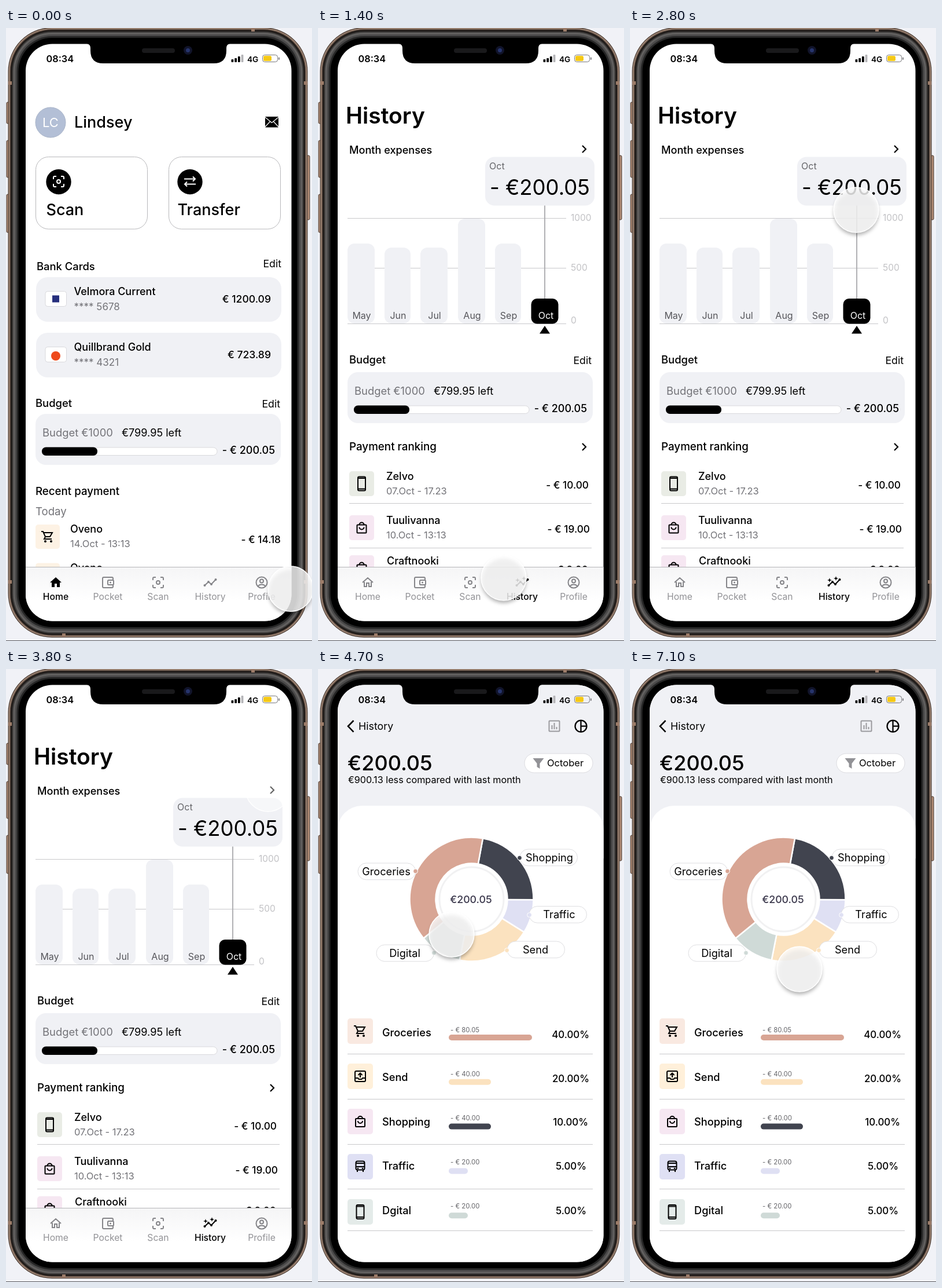
Recreate the animation shown at these times as an HTML page. Size 529x1058 px, loop 7200 ms.

```html
<!DOCTYPE html>
<html lang="en">
<head>
<meta charset="utf-8">
<title>Banking app walkthrough</title>
<style>
  html, body { margin: 0; width: 100%; height: 100%; overflow: hidden; background: #f1f2f7; }
  svg { display: block; width: 100%; height: 100%; }
  text { font-family: Inter, sans-serif; white-space: pre; }
</style>
</head>
<body>
<svg id="stage" viewBox="0 0 529 1058"></svg>
<script>
const LOOP = 7200, STEP = 100;
const SOFT = '#f0f1f5', GREY = '#737378', RULE = '#c8c8cb';

// Drawing helpers
const text = (x, y, size, str, { w = 400, c = '#000', a = 'start' } = {}) =>
  `<text x="${x}" y="${y}" font-size="${size}" font-weight="${w}" fill="${c}" text-anchor="${a}">${str}</text>`;
const bold = (x, y, size, str, a) => text(x, y, size, str, { w: 500, a });
const rect = (x, y, w, h, r, fill, stroke = 'none', sw = 1) =>
  `<rect x="${x}" y="${y}" width="${w}" height="${h}" rx="${r}" fill="${fill}" stroke="${stroke}" stroke-width="${sw}"/>`;
const circle = (x, y, r, fill, stroke = 'none', sw = 1) =>
  `<circle cx="${x}" cy="${y}" r="${r}" fill="${fill}" stroke="${stroke}" stroke-width="${sw}"/>`;
const path = (d, stroke, sw = 1, fill = 'none') =>
  `<path d="${d}" fill="${fill}" stroke="${stroke}" stroke-width="${sw}"/>`;
const rule = (x1, x2, y, c = RULE) => path(`M${x1} ${y}H${x2}`, c);
const chevron = y => path(`M457 ${y - 6}l6 6-6 6`, '#000', 2.2);
const dot = (x, y, r) => circle(x, y, r, 'currentColor');

// Icons on a 24 unit grid
const line = d => path(d, 'currentColor', 2);
const box = (x, y, w, h, r) => rect(x, y, w, h, r, 'none', 'currentColor', 2);
const trend = line('M2.5 17 9 11l5 4 7.5-8') + dot(2.5, 17, 2) + dot(9, 11, 2) + dot(14, 15, 2) + dot(21.5, 7, 2);
const ICONS = {
  home: path('M10 20v-6h4v6h5v-8h3L12 3 2 12h3v8z', 'none', 0, 'currentColor'),
  homeLine: line('M6 11v8h4v-6h4v6h4v-8M3 12l9-8 9 8'),
  wallet: box(3, 3, 18, 18, 2) + rect(12, 8, 10, 8, 1.5, '#fafafa', 'currentColor', 2) + dot(16.5, 12, 1.5),
  scan: line('M3 8V5a2 2 0 0 1 2-2h3M16 3h3a2 2 0 0 1 2 2v3M21 16v3a2 2 0 0 1-2 2h-3M8 21H5a2 2 0 0 1-2-2v-3') +
    circle(12, 12, 3, 'none', 'currentColor', 2),
  trend,
  sparkle: trend + path('M4 4l1 3 3 1-3 1-1 3-1-3-3-1 3-1zM15 1l1 3 3 1-3 1-1 3-1-3-3-1 3-1z', 'none', 0, 'currentColor'),
  person: circle(12, 12, 9.5, 'none', 'currentColor', 2) + circle(12, 9.5, 3, 'none', 'currentColor', 2) +
    line('M5.5 18.5c3-4 10-4 13 0'),
  swap: line('M2 7.5h19M17 3.500l4 4-4 4M22 16.500H3M7 12.500l-4 4 4 4'),
  cart: line('M1 3h3l4 9h8l4-7H5.500M8 12l-2 4h13') + dot(8, 20, 2) + dot(18, 20, 2),
  bag: box(4, 7, 16, 14, 1) + line('M8 7a4 4 0 0 1 8 0M8 11a4 4 0 0 0 8 0'),
  phone: box(5.5, 0, 13, 24, 2) + line('M6 2.500h12M6 21h12'),
  send: box(3, 3, 18, 18, 2) + line('M12 14V7M8.500 10l3.500-3.500 3.500 3.500M3 15h5l1.500 2h5l1.500-2h5'),
  bus: box(4.5, 2.5, 15, 15, 3) + line('M5 6h14M5 12h14M7 17v4M17 17v4') + dot(8, 15, 1.3) + dot(16, 15, 1.3),
};
const icon = (name, cx, cy, size = 24, color = '#000') =>
  `<g color="${color}" transform="translate(${cx - size / 2} ${cy - size / 2}) scale(${size / 24})">${ICONS[name]}</g>`;
const tile = (name, x, y, size, fill) => rect(x, y, size, size, 5, fill) + icon(name, x + size / 2, y + size / 2);

// Shared blocks
const budget = y => rect(51, y, 424, 88, 18, SOFT) +
  text(63, y + 39, 18.4, 'Budget €1000', { c: GREY }) + text(200, y + 39, 18.1, '€799.95 left') +
  rect(62, y + 58, 303, 13.5, 6.7, '#fff', '#d9d9dc') + rect(62, y + 57.5, 96, 14.5, 7, '#000') +
  bold(465, y + 69, 18, '- € 200.05', 'end');

function nav(active) {
  const items = [['Home', active ? 'homeLine' : 'home', 86], ['Pocket', 'wallet', 176], ['Scan', 'scan', 263],
    ['History', active ? 'sparkle' : 'trend', 353], ['Profile', 'person', 442]];
  return rect(34, 930, 460, 96, 0, 'url(#bar)') + rule(34, 494, 930.5, '#b5b5b8') +
    items.map(([label, name, x], i) => {
      const on = i === active;
      return icon(name, x, 957, 24, on ? '#000' : '#858589') +
        text(x, 987, 15.7, label, { w: on ? 500 : 400, c: on ? '#000' : '#929296', a: 'middle' });
    }).join('');
}

const bankCard = (y, name, digits, amount, mark) => rect(52, y, 424, 77, 20, SOFT) +
  rect(68, y + 24.5, 36.5, 26, 4, '#fff', '#d9d9dd') + mark +
  bold(117.5, y + 31, 18, name) + text(117.5, y + 57, 17, '**** ' + digits, { c: GREY }) +
  bold(458, y + 44, 17.6, amount, 'end');

const payment = (x, y, name, date, amount, right, dy) => bold(x, y, 18, name) +
  text(x, y + 25, 16.5, date, { c: GREY }) + bold(right, y + dy, 17.3, amount, 'end');

const homePage = () =>
  circle(77, 163, 26, '#b3bfd6', '#a9b4c8') + text(77, 171, 22, 'LC', { c: '#fff', a: 'middle' }) +
  bold(118, 172, 27, 'Lindsey') +
  rect(448, 153, 23, 18.5, 1, '#000') + path('M448 154l11.500 9.500L471 154M448 170.500l8.500-9M471 170.500l-8.500-9', '#fff', 1.2) +
  [[51, 'scan', 'Scan', 91], [281, 'swap', 'Transfer', 318]].map(([x, name, label, cx]) =>
    rect(x + .5, 222.5, 193, 124.5, 22, '#fff', '#b8b8bb') + circle(cx, 265.5, 21.7, '#000') +
    icon(name, cx, 265, 24, '#fff') + bold(cx - 21.5, 323, 27, label)).join('') +
  bold(53, 418, 18.4, 'Bank Cards') + text(476, 413, 17.7, 'Edit', { a: 'end' }) +
  bankCard(430, 'Velmora Current', '5678', '€ 1200.09', rect(80, 461.5, 12, 12, 0, '#262f7d')) +
  bankCard(526, 'Quillbrand Gold', '4321', '€ 723.89', circle(86, 566, 8, '#ee4a1c')) +
  bold(51, 654, 18.4, 'Budget') + text(474, 655, 17.7, 'Edit', { a: 'end' }) + budget(666) +
  bold(51, 806, 18.7, 'Recent payment') + text(51, 841, 18.6, 'Today', { c: GREY }) +
  tile('cart', 51, 857, 42, '#fdf2e4') + payment(111, 871, 'Oveno', '14.Oct - 13:13', '- € 14.18', 475, 18) +
  tile('cart', 51, 923.5, 42, '#fdf2e4') + bold(111, 938, 18, 'Oveno') + nav(0);

const historyPage = () => {
  const bars = [['May', 51, 47, 372], ['Jun', 115, 45, 379], ['Jul', 177, 47, 379], ['Aug', 242, 47, 329], ['Sep', 306, 45, 372]];
  return text(48, 165, 39, 'History', { w: 600 }) +
    bold(54, 217, 18.1, 'Month expenses') + chevron(209) +
    [[328.5, 333, 1000], [414.5, 419, 500], [510.5, 510, 0]].map(([y, ty, n]) =>
      rule(51, 429, y) + text(437, ty, 15.5, n, { c: '#c2c2c5' })).join('') +
    bars.map(([m, x, w, y]) => rect(x, y, w, 510 - y, 12, SOFT) +
      text(x + w / 2 + 1, 502, 16, m, { c: '#55555a', a: 'middle' })).join('') +
    path('M392 304V468', '#a9a9ac', 1.8) + rect(368.5, 467, 47, 43.5, 10, '#000') +
    text(394, 502, 16, 'Oct', { c: '#fff', a: 'middle' }) + path('M383 527.500h18l-9-13.500z', 'none', 0, '#000') +
    rect(289, 222.5, 189, 84, 16, SOFT) + text(296, 244, 16, 'Oct', { c: '#66666a' }) +
    text(470, 288, 36.5, '- €200.05', { a: 'end' }) +
    bold(54, 579, 18.4, 'Budget') + text(473, 580, 17.7, 'Edit', { a: 'end' }) + budget(594) +
    bold(54, 729, 18.8, 'Payment ranking') + chevron(723) +
    tile('phone', 54, 765, 43, '#e9ece5') + payment(118, 780, 'Zelvo', '07.Oct - 17.23', '- € 10.00', 468, 15) +
    rule(54, 473, 820.5) +
    tile('bag', 54, 841, 43, '#f6e7f2') + payment(118, 856, 'Tuulivanna', '10.Oct - 13:13', '- € 19.00', 470, 15) +
    rule(54, 473, 897.5) +
    tile('bag', 54, 910, 43, '#f6e7f2') + bold(119, 926, 18, 'Craftnooki') + bold(467, 941, 17.3, '- € 9.00', 'end') + nav(3);
};

const HUES = { Groceries: '#d8a594', Send: '#fbe2bf', Shopping: '#41444f', Traffic: '#dfe0f3', Digital: '#cfdad7' };

function slice(from, to, fill) {
  const at = (deg, r) => [265.5 + r * Math.sin(deg * Math.PI / 180), 397.5 - r * Math.cos(deg * Math.PI / 180)].join(' ');
  const big = +(to - from > 180);
  return path(`M${at(from, 107)}A107 107 0 ${big} 1 ${at(to, 107)}L${at(to, 62)}A62 62 0 ${big} 0 ${at(from, 62)}z`, '#fff', 2.5, fill);
}

const detailPage = () => {
  const slices = [['Shopping', 10.5, 90.4], ['Traffic', 90.4, 122], ['Send', 122, 191.2], ['Digital', 191.2, 231], ['Groceries', 231, 370.5]];
  const pills = [['Groceries', 69, 335, 168.5, 349], ['Shopping', 349, 311, 348.5, 326], ['Traffic', 365, 409.5, 365.5, 424.5],
    ['Send', 327, 470, 326.5, 485.5], ['Digital', 101, 476, 200.5, 490]];
  const rows = [['Groceries', 'cart', '#f9e9e1', 144, '80.05', '40.00%', 469], ['Send', 'send', '#fff0da', 73, '40.00', '20.00%', 469],
    ['Shopping', 'bag', '#f6e7f2', 73, '40.00', '10.00%', 467], ['Traffic', 'bus', '#dfe0f4', 33, '20.00', '5.00%', 464],
    ['Digital', 'phone', '#e4ebe9', 33, '20.00', '5.00%', 464]];
  return rect(34, 27, 460, 300, 0, SOFT) + rect(34, 236, 460, 840, 42, '#fff') +
    path('M61.500 89 52 98.800l9.500 9.800', '#000', 2.6) + text(70, 105, 17.8, 'History') +
    rect(399.5, 89.5, 18, 18, 1, 'none', '#9a9a9e', 2) + path('M404.500 97v7M408.500 93v11M412.500 100v4', '#9a9a9e', 2) +
    circle(454.5, 98.7, 10, 'none', '#000', 2.3) + path('M454.500 89v20M454.500 98.700h10', '#000', 2.3) +
    bold(51, 175, 36, '€200.05') + text(52, 197, 16.2, '€900.13 less compared with last month') +
    rect(357, 146, 118, 33, 16.5, '#fff', '#dcdce0') + path('M371.500 154h19l-7 9v9l-5-3v-6z', 'none', 0, '#929296') +
    text(396, 168, 16.5, 'October') +
    slices.map(([name, a, b]) => slice(a, b, HUES[name])).join('') +
    circle(265.5, 397.5, 55.5, '#fff', '#f1f1f2', 3) +
    text(264.5, 404, 17.8, '€200.05', { w: 500, c: '#3b384c', a: 'middle' }) +
    pills.map(([name, x, y, dx, dy]) => rect(x, y, 99.5, 28.7, 14.3, '#fff', '#dedee1') +
      text(x + (name === 'Shopping' ? 51 : name === 'Traffic' ? 52 : 49), y + 20.5, 18.2, name, { a: 'middle' }) +
      circle(dx, dy, 3.9, HUES[name], '#fff')).join('') +
    rows.map(([name, glyph, fill, w, sum, pct, right], i) => {
      const y = 603 + 78 * i;
      const mid = 634 + 76.8 * i;
      return tile(glyph, 51, y, 44, fill) + bold(111, mid, 18.2, name === 'Digital' ? 'Dgital' : name) +
        text(229, 626.5 + 76.2 * i, 11.4, '- € ' + sum, { c: '#66666a' }) +
        rect(226, 631 + 76.8 * i, w, 10, 5, HUES[name]) +
        bold(right, mid + (i < 2 ? 2.5 : 0), 16.9, pct, 'end') +
        rule(51, 475, [664.5, 742.5, 820.5, 897.5, 969.5][i]);
    }).join('');
};

// Metal rim built from nested outlines, outermost first: inset, colour
const RIM = [[0, '#4a3c34'], [1.2, '#a48a79'], [3, '#5b4a40'], [4.5, '#1d1917'], [7, '#3c3a39'], [9, '#62605f'],
  [12, '#4b4a4a'], [15, '#262626'], [18, '#000']];

const phoneBody = () => {
  const bronze = '#9c7c69';
  return [[1, 128, 37], [1, 194, 64], [1, 287, 66], [520, 220, 111]].map(([x, y, h]) => rect(x, y, 5, h, 2, '#b08c76', '#4b3a30')).join('') +
    RIM.map(([d, c]) => rect(3.5 + d, d - 1, 518 - 2 * d, 1053 - 2 * d, 76 - d, c)).join('') +
    rect(424, 0, 6, 6, 0, bronze) + rect(97, 1045, 6, 6, 0, bronze) +
    [92, 953].map(y => rect(4, y, 6, 6, 0, bronze) + rect(515, y, 6, 6, 0, bronze)).join('');
};

const statusBar = () =>
  path('M140 27q6 1 6 8v4q0 22 22 22h191q22 0 22-22v-4q0-7 6-8z', 'none', 0, '#000') +
  rect(235, 35, 57, 8, 4, '#19191b') + circle(314.5, 38.5, 7.5, '#11142a') + circle(314.5, 38.5, 3.5, '#26346c') +
  text(69.5, 58.5, 16.3, '08:34', { w: 600 }) +
  [5, 7, 10, 13].map((h, i) => rect(389.5 + 5.7 * i, 59 - h, 3.8, h, 1, i < 3 ? '#000' : '#b5b5b8')).join('') +
  text(417, 58.5, 13.7, '4G', { w: 600 }) +
  rect(443.5, 46.5, 26, 12, 3.8, 'none', '#77777a') + rect(445, 48, 14, 9, 2.5, '#f6c915') + rect(471, 50.5, 1.8, 4.5, 1, '#77777a');

const stage = document.getElementById('stage');
stage.innerHTML = `<defs>
  <linearGradient id="bar" x2="0" y2="1"><stop stop-color="#f5f5f6"/><stop offset=".6" stop-color="#fff"/></linearGradient>
  <clipPath id="screen"><rect x="34" y="27.500" width="459.500" height="996" rx="46"/></clipPath>
  <filter id="blur" x="-30%" y="-30%" width="160%" height="160%"><feGaussianBlur stdDeviation="3"/></filter></defs>
  ${phoneBody()}${rule(0, 529, 1057.5, '#55565a')}
  <g clip-path="url(#screen)">${rect(34, 27, 460, 998, 0, '#fff')}
  ${[homePage, historyPage, detailPage].map(page => `<g class="page">${page()}</g>`).join('')}</g>${statusBar()}
  <g id="cursor"><circle id="shade" cy="5" r="38.500" fill="#000" fill-opacity=".3" filter="url(#blur)"/>
  <circle id="disc" r="39" fill="#fff" stroke="#fff" stroke-width="1.500"/></g>`;

const pages = stage.querySelectorAll('.page');
const [cursor, shade, disc] = ['cursor', 'shade', 'disc'].map(id => document.getElementById(id));

// Cursor stops: time, x, y
const STOPS = [[0, 492, 968], [900, 354, 966], [1150, 352, 966], [1400, 321, 949], [1600, 321, 945], [2800, 391, 314],
  [3600, 453, 207], [4050, 453, 207], [4700, 231, 458], [5200, 276, 489], [5700, 293, 518], [LOOP, 293, 518]];

function cursorAt(t) {
  const i = STOPS.findIndex(stop => stop[0] > t);
  const [t0, x0, y0] = STOPS[i - 1], [t1, x1, y1] = STOPS[i];
  const u = (t - t0) / (t1 - t0), k = u * u * (3 - 2 * u);
  return [x0 + (x1 - x0) * k, y0 + (y1 - y0) * k];
}
const press = (t, at) => Math.max(0, 1 - Math.abs(t - at) / 200);

function draw(now) {
  const t = Math.floor(now % LOOP / STEP) * STEP;
  const current = t < 1100 ? 0 : t < 3900 ? 1 : 2;
  pages.forEach((page, i) => page.style.display = i === current ? '' : 'none');
  const p = press(t, 1100) + press(t, 3800);
  cursor.setAttribute('transform', `translate(${cursorAt(t)})`);
  shade.setAttribute('opacity', 1 - p);
  disc.setAttribute('fill-opacity', .8 - .4 * p);
  requestAnimationFrame(draw);
}
draw(0);
</script>
</body>
</html>
```
